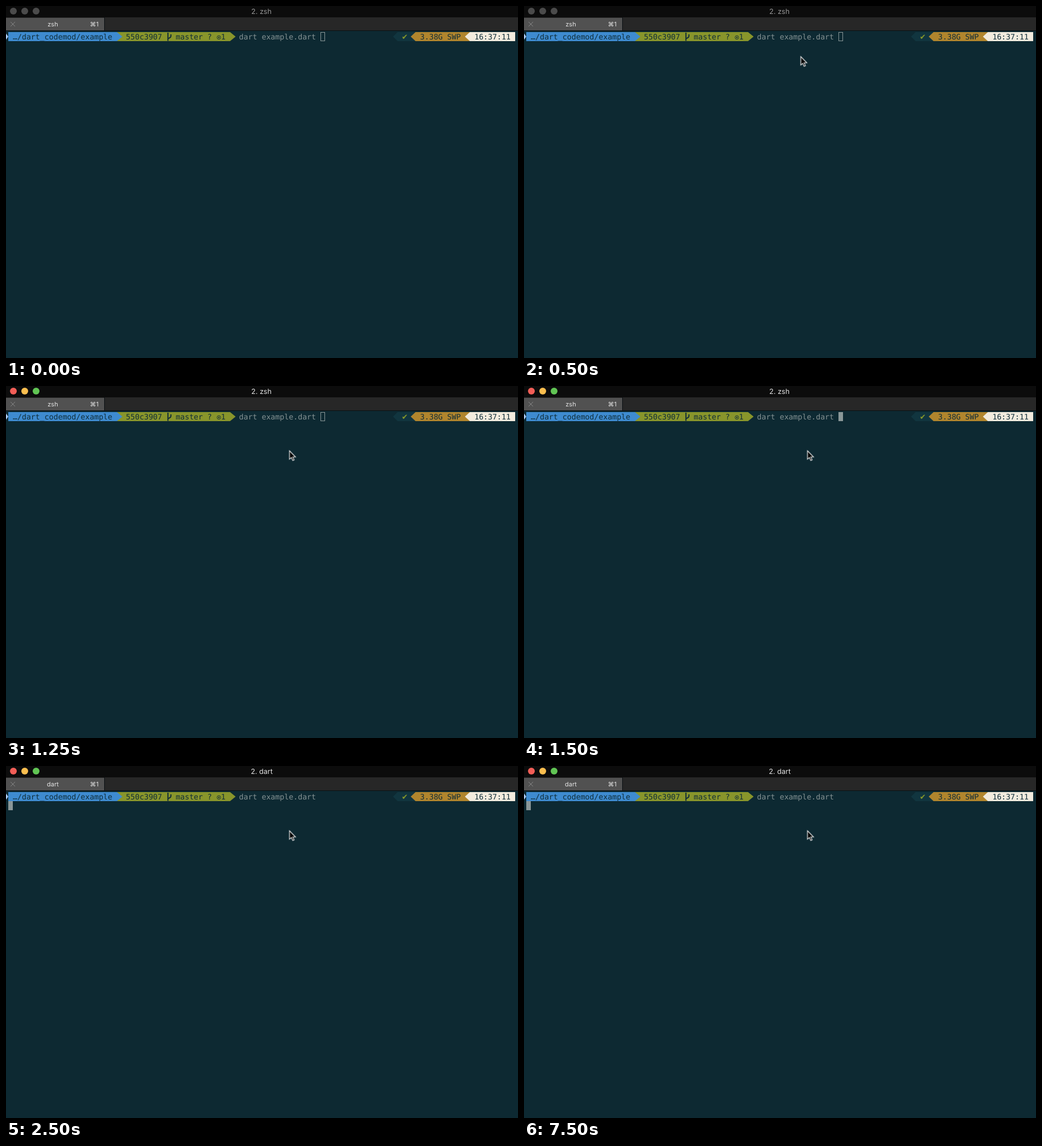
Animation of 902 by 621 pixels, one loop 8 s. Source, as an HTML page:

```html
<!DOCTYPE html>
<html lang="en">
<head>
<meta charset="utf-8">
<title>Terminal</title>
<style>
html, body { margin: 0; width: 100%; height: 100%; overflow: hidden; background: #0d2932; }
svg { display: block; width: 902px; height: 621px; }
text { white-space: pre; text-rendering: geometricPrecision; }
.ui { font: 12.6px Inter, "Open Sans", sans-serif; text-anchor: middle; }
.tab { font-size: 11px; fill: #e4e4e4; }
.term { font: 13.244px "DejaVu Sans Mono", "Liberation Mono", monospace; fill: #102d38; }
.term .typed { fill: #859293; }
.term .tick { font: 13.2px "DejaVu Sans", sans-serif; fill: #87972b; }

.anim, .light { animation: 8s step-end infinite; }
.light { animation-name: light; }
.title { animation-name: title; }
.zsh { animation-name: hide-late; }
.dart { animation-name: show-late; }
.pointer { animation-name: point; }
.prompt-cursor { animation-name: prompt-cursor; }
.run-cursor { animation-name: run-cursor; }

@keyframes light { 0% { fill: #4b4b4b; } 15.625%, 100% { fill: var(--on); } }
@keyframes title { 0% { fill: #969696; } 15.625%, 100% { fill: #e2e2e2; } }
@keyframes hide-late { 0% { opacity: 1; } 31.25%, 100% { opacity: 0; } }
@keyframes show-late { 0% { opacity: 0; } 31.25%, 100% { opacity: 1; } }
@keyframes point {
  0% { opacity: 0; transform: translate(487.6px, 89.2px); }
  6.25% { opacity: 1; transform: translate(487.6px, 89.2px); }
  12.5% { opacity: 1; transform: translate(492px, 97.2px); }
  15.625%, 100% { opacity: 1; transform: translate(499.4px, 114.2px); }
}
@keyframes prompt-cursor {
  0% { opacity: 1; fill: #0d2932; }
  18.75% { opacity: 1; fill: #8a9798; }
  21.875%, 100% { opacity: 0; fill: #8a9798; }
}
@keyframes run-cursor { 0% { opacity: 0; } 21.875%, 100% { opacity: 1; } }
</style>
</head>
<body>
<svg viewBox="0 0 902 621">
  <rect width="902" height="621" fill="#0d2932"/>

  <!-- window bar -->
  <rect width="902" height="20" fill="#0c0c0c"/>
  <circle class="light" style="--on:#f25e57" cx="13" cy="9" r="6"/>
  <circle class="light" style="--on:#fbbe4f" cx="33" cy="9" r="6"/>
  <circle class="light" style="--on:#61c554" cx="53" cy="9" r="6"/>
  <g class="ui anim title">
    <text class="anim zsh" x="450" y="14">2. zsh</text>
    <text class="anim dart" x="450.5" y="14">2. dart</text>
  </g>

  <!-- tab bar -->
  <rect y="20" width="902" height="23" fill="#272727"/>
  <rect y="21" width="173" height="22" fill="#515151"/>
  <path d="M173.5 20V43M0 43.5H902" stroke="#0b1013"/>
  <path d="M8 28l8 8m0-8l-8 8" stroke="#858585"/>
  <g class="ui">
    <text class="tab anim zsh" x="82.5" y="36">zsh</text>
    <text class="tab anim dart" x="82.5" y="36">dart</text>
    <text class="tab" x="155.5" y="36">⌘1</text>
  </g>

  <!-- prompt segments -->
  <path d="M0 48.5L4 54L0 59.5Z" fill="#a8c8f2"/>
  <path d="M195 46H394.7L404.5 54L394.7 62H195Z" fill="#88952b"/>
  <path d="M4 46H195.4L205 54L195.4 62H4Z" fill="#3e8bd0"/>
  <path d="M690 46H722V62H690L681.7 54Z" fill="#11353f"/>
  <path d="M721.5 46H818V62H721.5L713 54Z" fill="#b0852d"/>
  <path d="M817.2 46H897V62H817.2L808.5 54Z" fill="#f1ebde"/>
  <g class="term">
    <text x="12" y="59">…/dart_codemod/example</text>
    <text x="211.3" y="59">550c3907</text>
    <text x="299" y="59">master ?</text>
    <text x="378.7" y="59">1</text>
    <text class="typed" x="410.6" y="59">dart example.dart</text>
    <text class="tick" x="697" y="59">✔</text>
    <text x="729.5" y="59">3.38G SWP</text>
    <text x="825.2" y="59">16:37:11</text>
  </g>
  <g fill="none" stroke="#102d38">
    <path d="M285.3 47V61.5M290.5 50V53.5Q290 56 285.3 57.5" stroke-width="2"/>
    <circle cx="375" cy="55.5" r="3.2" stroke-width=".9"/>
    <circle cx="375" cy="55.5" r="1.2" fill="#102d38" stroke="none"/>
  </g>

  <rect class="anim prompt-cursor" x="554.5" y="46.5" width="7" height="15" stroke="#8a9798"/>
  <rect class="anim run-cursor" x="4" y="62" width="8" height="16" fill="#8a9798"/>
  <path class="anim pointer" d="M0 0V15L3.4 11.9L5.8 17.2L8.2 16.1L5.9 11H10.6Z" fill="#050505" stroke="#f2f2f2" stroke-width="1.2"/>
</svg>
</body>
</html>
```
